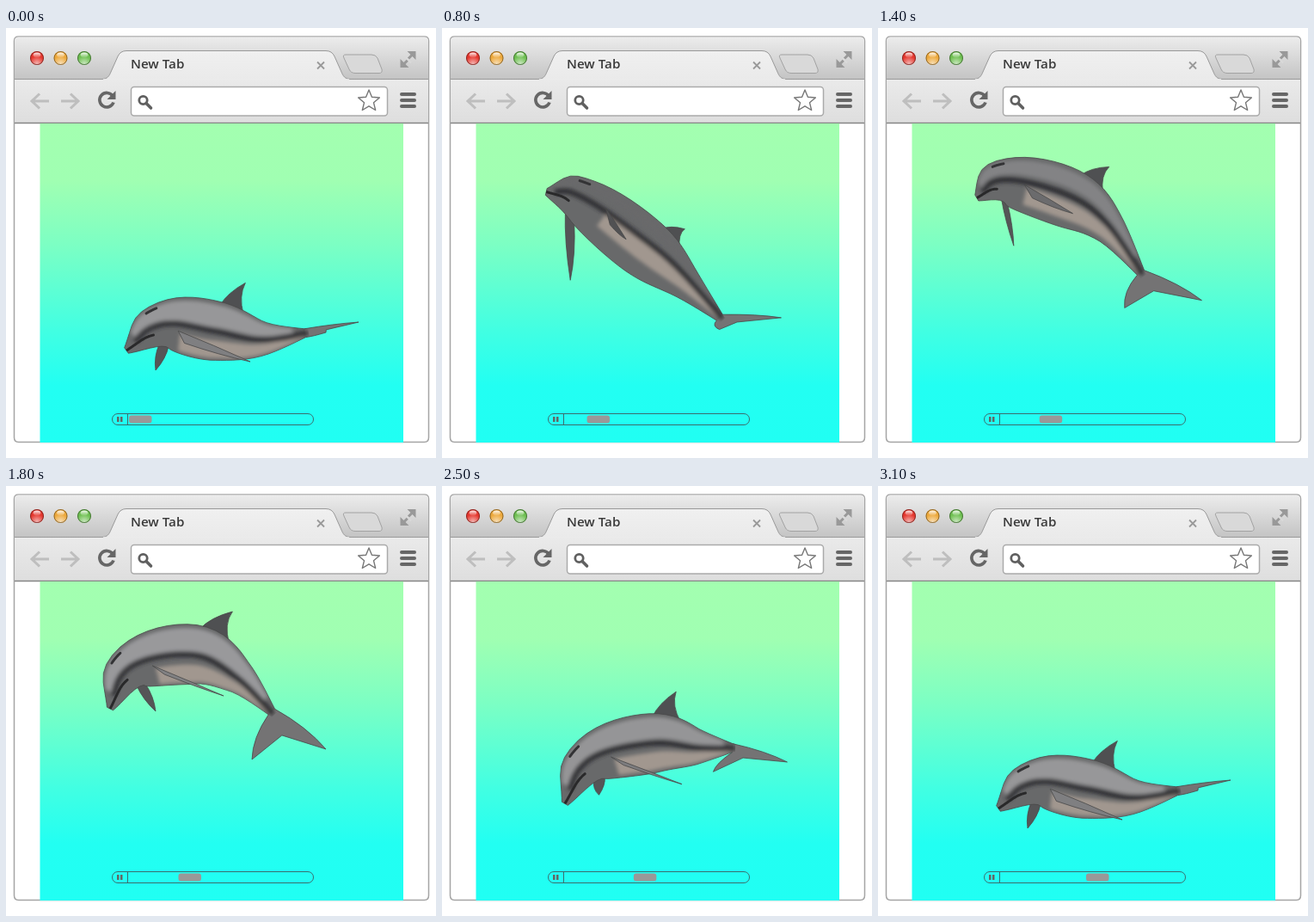
Write an HTML page that moves like this. It is 500x500 px and loops after 3.2 s.

```html
<!DOCTYPE html>
<html lang="en">
<head>
<meta charset="utf-8">
<title>Dolphin</title>
<style>
  html, body { margin: 0; width: 100%; height: 100%; overflow: hidden; background: #fff; }
  svg { display: block; width: 100%; height: 100%; }
  text { font: 600 15.2px "Open Sans", "Noto Sans", sans-serif; fill: #3a3a3a; }
</style>
</head>
<body>
<svg viewBox="0 0 500 500">
  <defs>
    <linearGradient id="title" x2="0" y2="1"><stop stop-color="#ececec"/><stop offset="1" stop-color="#c4c4c4"/></linearGradient>
    <linearGradient id="bar" gradientUnits="userSpaceOnUse" x1="0" y1="26" x2="0" y2="110">
      <stop stop-color="#f0f0f0"/><stop offset=".4" stop-color="#eaeaea"/><stop offset="1" stop-color="#dedede"/>
    </linearGradient>
    <linearGradient id="sea" gradientUnits="userSpaceOnUse" x1="0" y1="111" x2="0" y2="482">
      <stop stop-color="#a3ffb0"/><stop offset=".18" stop-color="#a0ffb2"/><stop offset=".375" stop-color="#7dffc3"/>
      <stop offset=".645" stop-color="#42ffe2"/><stop offset=".82" stop-color="#22fff2"/><stop offset="1" stop-color="#20fff3"/>
    </linearGradient>
    <linearGradient id="shine" x2="0" y2="1"><stop stop-color="#fff" stop-opacity=".9"/><stop offset="1" stop-color="#fff" stop-opacity=".1"/></linearGradient>
    <radialGradient id="glow" cy=".95" r=".6"><stop stop-color="#fff" stop-opacity=".65"/><stop offset="1" stop-color="#fff" stop-opacity="0"/></radialGradient>
    <g id="gloss">
      <circle r="7.5" fill="url(#glow)" stroke="#000" stroke-opacity=".4"/>
      <ellipse cy="-3.6" rx="4.3" ry="2.8" fill="url(#shine)"/>
    </g>
    <filter id="soft"><feGaussianBlur stdDeviation="2.2"/></filter>
    <clipPath id="skin"><path id="skinShape"/></clipPath>
  </defs>

  <!-- window -->
  <path d="M9.5 476V15q0-5 5-5h472q5 0 5 5v461q0 5.5-5 5.5h-472q-5 0-5-5.5z" fill="#fff" stroke="#a5a5a5" stroke-width="1.5"/>
  <path d="M10 59V15q0-4.5 4.5-4.5h472q4.5 0 4.5 4.5v44z" fill="url(#title)"/>
  <path d="M10 59.5H491V110H10z" fill="url(#bar)"/>
  <path d="M10 59.5H112C118 59 120 56 122 51L130 33Q133 26.5 140 26.5H372Q379 26.5 382 33L390 51C392 56 394 59 400 59.5H491" fill="url(#bar)" stroke="#999"/>
  <path d="M113 60.5H399" stroke="#eaeaea" stroke-width="2.5"/>
  <path d="M10 110.5H491" stroke="#858585" stroke-width="1.4"/>
  <path d="M395 31H425Q430 31 432 35L437 48Q438 52.5 434 52.5H406Q401 52.5 399 48L393 35Q391 31 395 31z" fill="#d9d9d9" stroke="#a2a2a2"/>
  <text x="145" y="47">New Tab</text>
  <path d="M362 39.5l8 8m0-8l-8 8" stroke="#999" stroke-width="1.8"/>
  <g fill="#999" stroke="#999">
    <path d="M466.5 27h10v10zM458.500 36v10h10z" stroke="none"/>
    <path d="M468 35.500l5-5M467 37.500l-6 6" stroke-width="3"/>
    <path d="M464 33.500l7 7" stroke="#dadada" stroke-width="2"/>
  </g>
  <circle cx="36" cy="35" r="8" fill="#e5382f"/><use href="#gloss" x="36" y="35"/>
  <circle cx="63.5" cy="35" r="8" fill="#eda93c"/><use href="#gloss" x="63.5" y="35"/>
  <circle cx="91" cy="35" r="8" fill="#6fc052"/><use href="#gloss" x="91" y="35"/>

  <!-- toolbar -->
  <path d="M50 85H30m9-8.5l-9 8.5 9 8.5M64 85H84m-9-8.5l9 8.5-9 8.5" fill="none" stroke="#bebebe" stroke-width="3"/>
  <path d="M124 79A8.300 8.300 0 1 0 125 86.500" fill="none" stroke="#666" stroke-width="3.600"/>
  <path d="M127.5 73v10h-10z" fill="#666"/>
  <rect x="145.5" y="68.5" width="298" height="33.5" rx="3.5" fill="#fff" stroke="#aaa" stroke-width="1.5"/>
  <circle cx="159.5" cy="84" r="4.7" fill="none" stroke="#606060" stroke-width="2.8"/>
  <path d="M163 87.5l5.5 5.5" stroke="#606060" stroke-width="3.6" stroke-linecap="round"/>
  <path id="star" fill="#fff" stroke="#777" stroke-width="1.4" stroke-linejoin="round"/>
  <path d="M460 77h15m-15 7h15m-15 7h15" stroke="#666" stroke-width="4" stroke-linecap="round"/>

  <!-- page -->
  <path d="M39.500 111H462V482H39.500z" fill="url(#sea)"/>
  <g stroke="#484848" stroke-width=".8" stroke-linejoin="round">
    <path id="far" fill="#555557"/>
    <path id="dorsal" fill="#4f5052"/>
    <path id="body" fill="#68696a"/>
    <path id="fluke" fill="#747374"/>
  </g>
  <g clip-path="url(#skin)" fill="none" stroke-linecap="round">
    <g filter="url(#soft)">
      <path id="back"/>
      <path id="belly" fill="#a1978f"/>
      <path id="stripe" stroke="#2b2b2d" stroke-width="7" stroke-opacity=".85"/>
    </g>
    <path id="mouth" stroke="#29292a" stroke-width="3"/>
    <path id="blowhole" stroke="#333335" stroke-width="3"/>
  </g>
  <path id="near" stroke="#484848" stroke-width=".8"/>

  <!-- progress bar -->
  <g fill="none" stroke="#3f5d5e" stroke-width=".9">
    <rect x="123.5" y="448.5" width="234" height="13" rx="6.5"/>
    <path d="M141.5 449v12"/>
  </g>
  <path d="M129 452h2.5v6H129zM133 452h2.5v6H133z" fill="#666"/>
  <rect id="thumb" y="450.5" width="26.500" height="9" rx="3" fill="#9a9898"/>
</svg>
<script>
const $ = id => document.getElementById(id);
const draw = (id, d) => $(id).setAttribute('d', d);
const mix = (a, b, f) => [a[0] + (b[0] - a[0]) * f, a[1] + (b[1] - a[1]) * f];
const add = (a, v, k = 1) => [a[0] + v[0] * k, a[1] + v[1] * k];
const sub = (a, b) => [a[0] - b[0], a[1] - b[1]];

// roll: depth of the dark flank stripe, 0 back to 1 belly
// spine: beak to tail root; tips: near flipper, far flipper, two flukes
const pose = (time, roll, spine, tips) =>
  ({ time, values: [roll, ...`${spine} ${tips}`.split(/[ ,]/).map(Number)] });

const poses = [
  pose(0, .56, '140,375 183,346 242,352 297,361 352,354', '284,388 174,398 410,342 372,354'),
  pose(500, .34, '134,265 176,268 245,314 297,350 350,366', '238,318 161,348 406,345 362,368'),
  pose(1000, .34, '115,165 157,174 228,223 270,260 313,320', '208,213 146,266 387,330 300,338'),
  pose(1800, .57, '121,259 148,210 219,196 269,221 312,266', '253,244 174,262 372,306 286,318'),
  pose(2200, .54, '141,333 168,273 236,254 282,265 325,276', '270,299 184,316 392,310 305,322'),
  pose(2700, .56, '142,384 177,341 248,325 305,327 350,325', '283,373 180,383 406,329 326,340')
];
const swim = 3100, loop = 3200, step = 100;

function keyAt(i) {
  const n = poses.length, lap = Math.floor(i / n), { time, values } = poses[i - lap * n];
  return { time: time + lap * swim, values };
}

// smooth cubic through the poses
function poseAt(t) {
  let i = poses.length - 1;
  while (poses[i].time > t) i--;
  const [a, b, c, d] = [-1, 0, 1, 2].map(o => keyAt(i + o));
  const span = c.time - b.time, u = (t - b.time) / span;
  return b.values.map((v, j) => {
    const w = c.values[j];
    const m = (w - a.values[j]) * span / (c.time - a.time);
    const n = (d.values[j] - v) * span / (d.time - b.time);
    return v + u * (m + u * (3 * (w - v) - 2 * m - n + u * (2 * (v - w) + m + n)));
  });
}

function spineAt(pts, u) {
  const last = pts.length - 1, i = Math.min(last - 1, Math.floor(u * last)), f = u * last - i;
  const [a, b, c, d] = [-1, 0, 1, 2].map(o => pts[Math.max(0, Math.min(last, i + o))]);
  return [0, 1].map(k => {
    const m = (c[k] - a[k]) / 2, n = (d[k] - b[k]) / 2;
    return b[k] + f * (m + f * (3 * (c[k] - b[k]) - 2 * m - n + f * (2 * (b[k] - c[k]) + m + n)));
  });
}

const girth = u => 4 + 31 * Math.sin(Math.PI * u ** .87) ** 1.4;
const melon = u => 4 * Math.exp(-(((u - .16) / .06) ** 2));

function blade(a, b, tip, bulge, hollow) {
  const width = sub(a, b);
  return `M${a}Q${add(mix(a, tip, .5), width, bulge)} ${tip}Q${add(mix(b, tip, .5), width, hollow)} ${b}Z`;
}

function render(t) {
  const [roll, ...xy] = poseAt(t % swim);
  const pts = Array.from({ length: xy.length / 2 }, (_, i) => xy.slice(2 * i, 2 * i + 2));
  const spine = pts.slice(0, 5), [nearTip, farTip, flukeA, flukeB] = pts.slice(5);

  const forward = u => {
    const v = sub(spineAt(spine, Math.min(1, u + .01)), spineAt(spine, Math.max(0, u - .01)));
    const len = Math.hypot(...v);
    return v.map(x => x / len);
  };
  // point on the flank: u from beak to tail, depth 0 back to 1 belly
  const flank = (u, depth) => {
    const [x, y] = forward(u), k = (2 * depth - 1) * girth(u) - (1 - depth) * melon(u);
    return add(spineAt(spine, u), [-y, x], k);
  };
  const line = (from, to, depthA, depthB = depthA) => Array.from({ length: 33 }, (_, i) =>
    flank(from + (to - from) * i / 32, depthA + (depthB - depthA) * i / 32));
  const open = p => 'M' + p.join('L');
  const band = (from, to, top, low) => open([...line(from, to, top), ...line(to, from, low)]) + 'Z';

  const body = band(0, 1, 0, 1);
  draw('body', body);
  draw('skinShape', body);
  draw('back', band(.1, .9, .06, roll - .12));
  draw('belly', band(.34, .97, roll + .1, Math.min(.97, roll + .4)));
  draw('stripe', open(line(.1, .97, .45, roll)));
  draw('mouth', open(line(0, .18, .5, .66)));
  draw('blowhole', open(line(.2, .24, .1)));

  const shade = 105 + 190 * (roll - .34), grey = k => `rgb(${k},${k},${k + 2})`;
  $('back').setAttribute('fill', grey(shade + 4));
  $('near').setAttribute('fill', grey(shade - 20));

  const front = flank(.51, .06), rear = flank(.63, .06), [fx, fy] = forward(.57);
  const height = 60 * roll, dorsalTip = add(add(mix(front, rear, .5), [fy, -fx], height), [fx, fy], height * .28);
  draw('dorsal', blade(front, rear, dorsalTip, .2, .25));
  draw('near', blade(flank(.33, roll + .05), flank(.37, roll + .24), nearTip, .1, -.2));
  draw('far', blade(flank(.18, .94), flank(.26, .94), farTip, .4, -.4));

  const top = flank(.97, 0), low = flank(.97, 1);
  const notch = mix(flank(1, .5), mix(flukeA, flukeB, .5), .52);
  const edge = (a, tip) => add(mix(a, tip, .5), sub(mix(a, tip, .5), notch), .35);
  draw('fluke', `M${top}Q${edge(top, flukeA)} ${flukeA}L${notch}L${flukeB}Q${edge(low, flukeB)} ${low}`);

  $('thumb').setAttribute('x', 143 + 99 * t / swim);
}

draw('star', 'M' + Array.from({ length: 10 }, (_, i) => {
  const r = i % 2 ? 5.8 : 13, a = i * Math.PI / 5;
  return [422 + r * Math.sin(a), 85 - r * Math.cos(a)];
}).join('L') + 'Z');

const start = performance.now();
function tick() {
  const t = (performance.now() - start) % loop;
  render(Math.floor(t / step) * step);
  requestAnimationFrame(tick);
}
tick();
</script>
</body>
</html>
```
